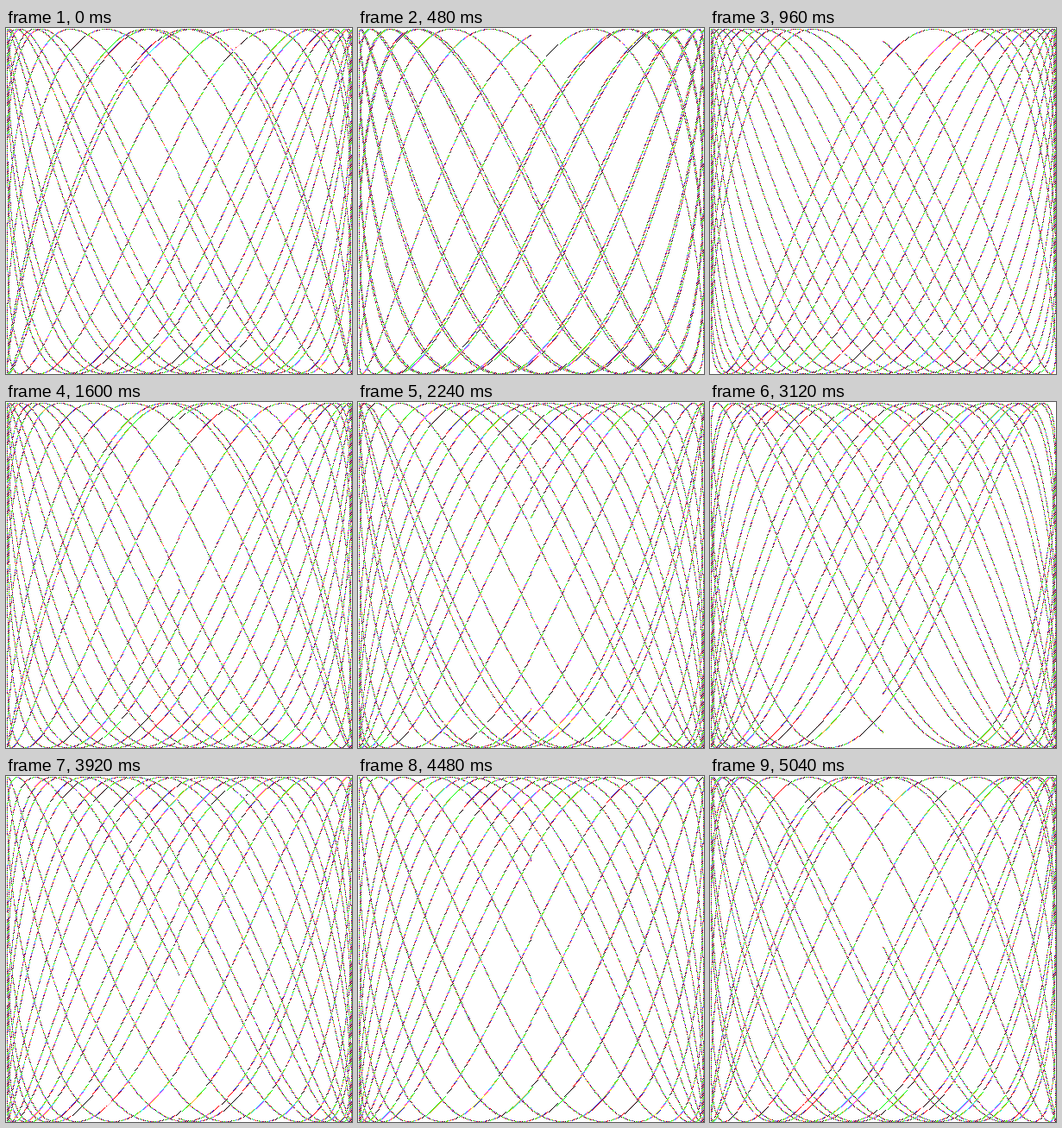
These frames come from a looping animation (401 by 401 pixels, 5120 ms). An HTML page with a canvas:

```html
<!DOCTYPE html>
<html lang="en">
<head>
<meta charset="utf-8">
<title>Lissajous</title>
<style>
  html, body { margin: 0; width: 100%; height: 100%; overflow: hidden; background: #fff; }
  canvas { display: block; width: 401px; height: 401px; }
</style>
</head>
<body>
<canvas id="stage" width="401" height="401"></canvas>
<script>
const RADIUS = 200;
const SIZE = 2 * RADIUS + 1;
const CYCLES = 10;
const STEP = 0.001;
const FREQUENCY = 2.0805;
const PHASE_STEP = 0.1;
const POSES = 64;
const POSE_MS = 80;

const rgb = (r, g, b) => (255 << 24 | b << 16 | g << 8 | r) >>> 0;
const WHITE = rgb(255, 255, 255);
const PALETTE = [
  rgb(0, 0, 0),
  WHITE,
  rgb(0, 255, 0),
  rgb(255, 165, 0),
  rgb(0, 255, 255),
  rgb(255, 0, 255),
  rgb(255, 255, 0),
  rgb(0, 0, 255),
  rgb(255, 0, 0),
  rgb(255, 192, 203)
];

const ctx = document.getElementById('stage').getContext('2d');
const image = ctx.createImageData(SIZE, SIZE);
const pixels = new Uint32Array(image.data.buffer);

// Rounds by truncating toward zero, so the curve spans 1..400.
const toPixel = v => RADIUS + Math.trunc(v * RADIUS + 0.5);

function draw(pose) {
  const phase = pose * PHASE_STEP;
  const end = CYCLES * 2 * Math.PI;
  pixels.fill(WHITE);
  for (let t = 0; t < end; t += STEP) {
    const x = toPixel(Math.sin(t));
    const y = toPixel(Math.sin(t * FREQUENCY - phase));
    // Colours run in diagonal bands across the stage.
    pixels[y * SIZE + x] = PALETTE[(x + y) % PALETTE.length];
  }
  ctx.putImageData(image, 0, 0);
}

const start = performance.now();
let shown = -1;

function tick() {
  const elapsed = Math.max(0, performance.now() - start);
  const pose = Math.floor(elapsed / POSE_MS) % POSES;
  if (pose !== shown) {
    draw(pose);
    shown = pose;
  }
  requestAnimationFrame(tick);
}
tick();
</script>
</body>
</html>
```
